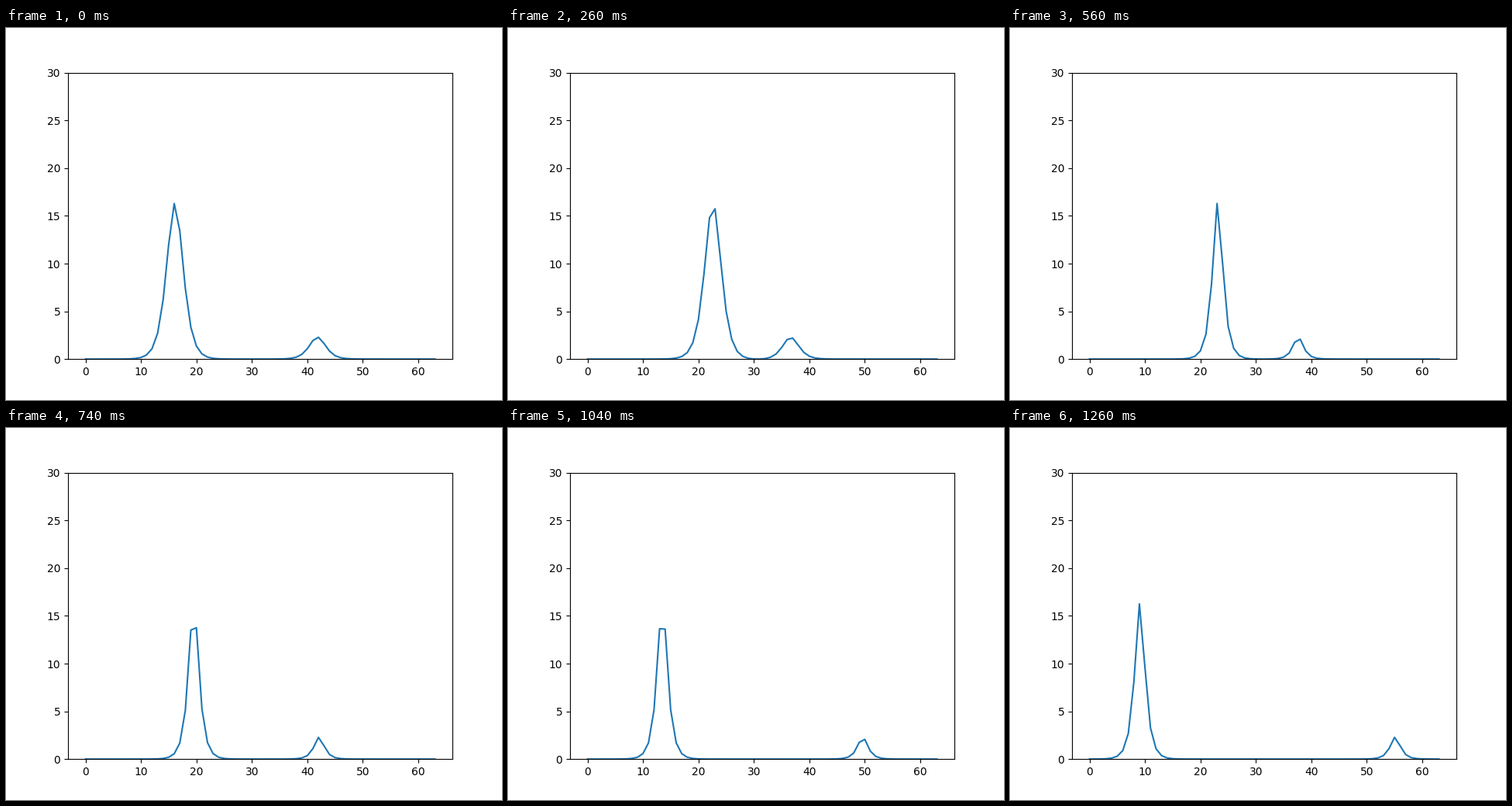
A matplotlib script that plays this animation: 640 by 480 pixels, repeating every 1280 ms.

```python
import numpy as np
import matplotlib.pyplot as plt
from matplotlib.animation import FuncAnimation

SITES = np.arange(64)
FRAMES = 64
INTERVAL = 20  # ms


def amplitude(u, height, kappa, c, skew):
    """Square root of a solitary pulse, u being the distance from its centre."""
    pulse = height * (1 + c) / (np.cosh(kappa * u) + c)
    return np.sqrt(pulse * np.exp(skew * u))


def profile(t):
    # Two pulses approach, recoil from each other and leave narrower
    left = min(16.12 + 0.5 * t, 34.35 - 0.401 * t)
    right = max(41.82 - 0.4 * t, 23.62 + 0.5 * t)

    after = 1 / (1 + np.exp(-0.9 * (t - 20.95)))
    clash = 1 / np.cosh(0.45 * (t - 21.4)) ** 2

    c = 0.72 - 0.97 * after
    kappa = 0.95 + 0.13 * after + 0.06 * clash
    skew = 0.07 * clash

    big = amplitude(SITES - left, 16.35 + 13.1 * clash, kappa, c, skew)
    small = amplitude(SITES - right, 2.3 + 2.1 * clash, kappa, c, skew)
    return (big - small) ** 2


fig, ax = plt.subplots(figsize=(6.4, 4.8), dpi=100)
line, = ax.plot(SITES, profile(0))
ax.set_ylim(0, 30)


def draw(frame):
    line.set_ydata(profile(frame))
    return line,


anim = FuncAnimation(fig, draw, frames=FRAMES, interval=INTERVAL,
                     repeat=True, repeat_delay=0)
plt.show()
```
